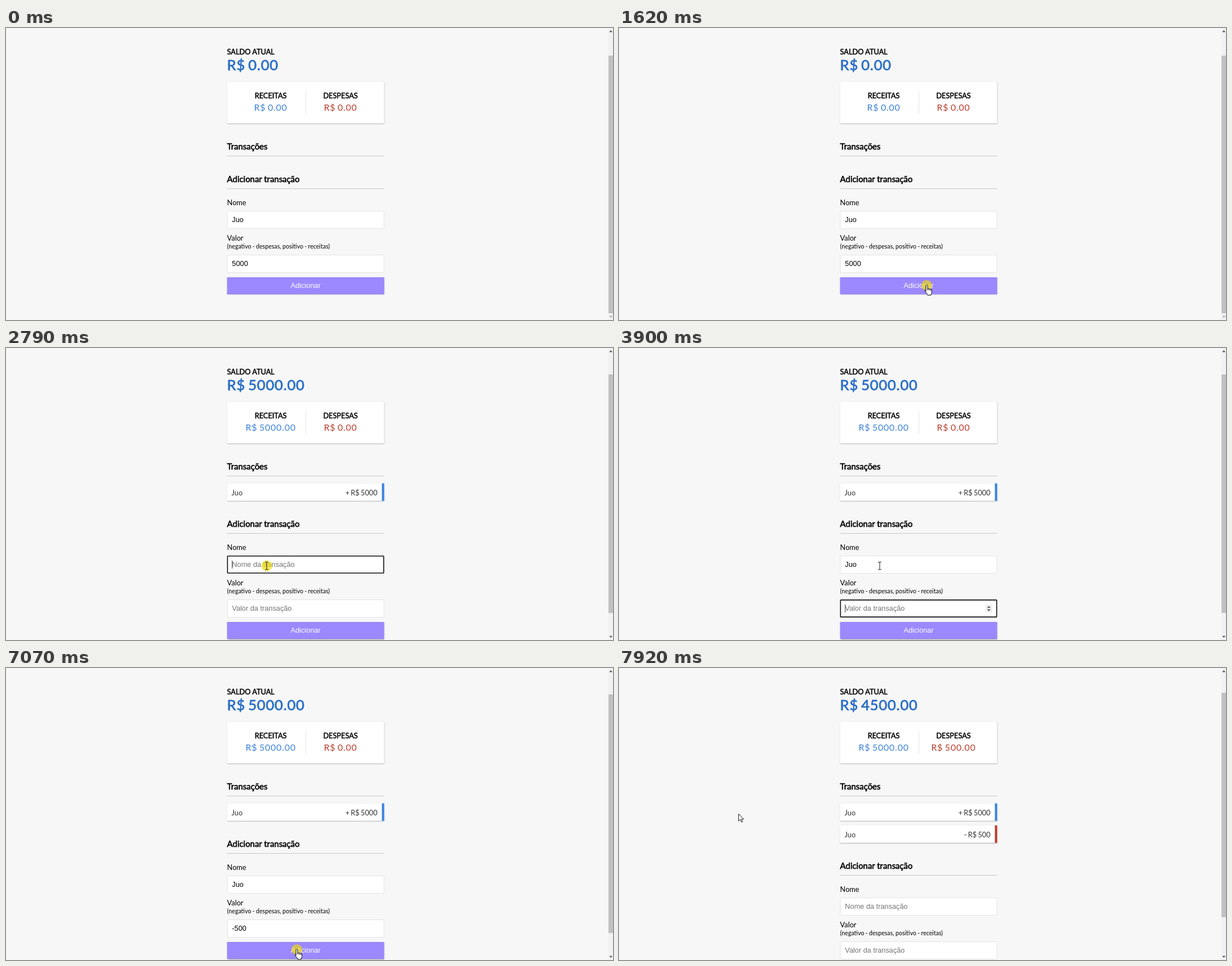
Write an HTML page that moves like this. It is 1078 px wide and 519 px high and loops after 8000 ms.

```html
<!DOCTYPE html>
<html lang="pt">
<head>
<meta charset="utf-8">
<title>Controle de despesas</title>
<style>
* { box-sizing: border-box; }
html, body { margin: 0; width: 100%; height: 100%; overflow: hidden; background: #f7f7f7; }
.stage { position: relative; width: 100%; height: 100%; overflow: clip; contain: strict; }
.page {
  position: absolute; left: 0; top: 0; width: 350px;
  transform: translate(392.6px, 33.4px) scale(.797); transform-origin: 0 0;
  font: 16px/19px Lato, sans-serif; color: #000;
}
h1, h3, h4 { margin: 0; font-weight: 400; -webkit-text-stroke: .04em; }
h1 { font-size: 32px; line-height: 39px; letter-spacing: 1px; color: #2c70c8; -webkit-text-stroke-width: .033em; }
h3 { font-size: 18.72px; line-height: 22px; padding-bottom: 10px; margin: 40px 0 10px; border-bottom: 1px solid #bbb; }
h4 { font-size: 16px; text-transform: uppercase; }
h1, h4, li span, small { position: relative; top: 1px; }
h1, .money, li { word-spacing: -.08em; }
.summary, li, button { background: #fff; box-shadow: 0 1px 3px rgba(0,0,0,.12), 0 1.3px 2px rgba(0,0,0,.32); }
.summary { display: flex; height: 93px; padding: 20px; margin: 20px 0; text-align: center; }
.summary div { flex: 1; }
.summary div:first-child { border-right: 1px solid #dedede; }
.money { margin: 5px 0; font-size: 20px; line-height: 24px; letter-spacing: 1px; }
.plus { color: #3a80d8; }
.minus { color: #b93c2b; }
ul { list-style: none; padding: 0; margin: 0 0 40px; }
li { display: flex; justify-content: space-between; padding: 10px; margin: 10px 0; color: #333; border-right: 5px solid #3882e0; }
li:first-child { margin-top: 16px; }
li + li { border-color: #c0392b; }
[hidden] { display: none !important; }
label { display: block; padding: 10px 0; }
small { display: block; font-size: 13.33px; word-spacing: -.04em; }
.field {
  position: relative; height: 40px; padding: 10px; border: 1px solid #dedede; border-radius: 2px;
  background: #fff; font: 16px/18px "Liberation Sans", Arial, sans-serif; white-space: pre;
}
.focus { outline: 2.5px solid #101010; outline-offset: -2px; }
.hint { color: #757575; }
.caret { display: inline-block; vertical-align: top; width: 1.25px; height: 18px; margin-right: -1.25px; background: #000; }
.spinner { position: absolute; right: 10px; top: 10px; width: 15px; height: 18px; background: #efefef; fill: #505050; }
.popup {
  position: absolute; z-index: 1; left: -1px; top: 41px; width: 350px; height: 48px; padding: 15px 16px;
  background: #fff; border-radius: 3px; font-size: 13px; box-shadow: 0 1px 4px rgba(0,0,0,.35);
}
button {
  display: block; width: 100%; height: 38px; margin: 10px 0 0; padding: 10px; border: 0;
  background: #9c88ff; color: #fff; font: 16px/18px "Liberation Sans", Arial, sans-serif;
}
.overlay { position: absolute; left: 0; top: 0; pointer-events: none; }
</style>
</head>
<body>
<div class="stage">
<div class="page">
  <h4>Saldo atual</h4>
  <h1 id="balance"></h1>
  <div class="summary">
    <div><h4>Receitas</h4><p class="money plus" id="income"></p></div>
    <div><h4>Despesas</h4><p class="money minus" id="expense"></p></div>
  </div>
  <h3>Transações</h3>
  <ul>
    <li><span>Juo</span><span>+ R$ 5000</span></li>
    <li><span>Juo</span><span>- R$ 500</span></li>
  </ul>
  <h3>Adicionar transação</h3>
  <label>Nome</label>
  <div class="field" id="name"><span></span><div class="popup" hidden>Juo</div></div>
  <label>Valor<small>(negativo - despesas, positivo - receitas)</small></label>
  <div class="field" id="amount"><span></span><svg class="spinner" viewBox="0 0 15 18"><path d="M3.5 7.3l4-4 4 4zM3.5 11l4 4 4-4z"/></svg></div>
  <button>Adicionar</button>
</div>
<svg class="overlay" width="1078" height="519">
  <path fill="#f1f1f1" d="M1069.5 0h8.5v519h-8.5z"/>
  <rect id="thumb" x="1070" width="8" fill="#c1c1c1"/>
  <path fill="#505050" d="M1071.3 7.3l2.9-3.3 2.9 3.3z"/>
  <path id="downArrow" d="M1071.3 511.8l2.9 3.3 2.9-3.3z"/>
  <g id="cursor">
    <circle id="click" r="9.5" fill="#f0dc00" fill-opacity=".65"/>
    <path id="arrow" fill="#fff" stroke="#000" stroke-width=".9" d="M.5.5V13l2.9-2.7 2.1 4.9 2-.9-2.1-4.7h3.9z"/>
    <path id="text" fill="none" stroke="#111" d="M-2.8-6.6h2L0-6 .8-6.6h2M0-6V6.2M-2.8 6.8h2L0 6.2l.8.6h2"/>
    <path id="hand" fill="#fff" stroke="#000" stroke-linejoin="round" d="M-1.5 11V1a1.5 1.5 0 0 1 3 0V6q2.2-1 2.7.6 2.2-.9 2.6.6 2.2-.6 2.2 1.4V12q0 2-1.5 3.6V17.4H1.5V16Q-1 13.5-3.2 10.2-4.2 8.4-3 8-2 7.7-1.5 9M1.5 6V8.8M4.2 6.6V9M6.8 7.2V9.4"/>
  </g>
</svg>
</div>
<script>
const LOOP = 8000, BLINK = 530;
const FIRST_ADD = 1770, SECOND_ADD = 7220;
const NAME_FOCUS = 2720, AMOUNT_FOCUS = 3900, BLUR = 7070;
const nameKeys = [[3190, 'J'], [3340, 'u'], [3570, 'o']];
const amountKeys = [[4890, '-'], [5350, '5'], [5590, '0'], [5820, '0']];
const clicks = [1620, NAME_FOCUS, BLUR];
// start, end, number of steps, destination
const moves = [
  [130, 920, 11, 548, 458.5],
  [1000, 1070, 2, 546.5, 457.5],
  [2100, 2640, 8, 463, 387],
  [6370, 6670, 5, 516.5, 500.5],
  [7380, 7920, 8, 212, 259]
];
// balance, income, expense, thumb top, thumb bottom
const totals = [[0, 0, 0, 49, 507], [5000, 5000, 0, 47, 471], [4500, 5000, 500, 44, 443]];

const $ = id => document.getElementById(id);
const show = (element, visible) => element.style.display = visible ? '' : 'none';
const within = (t, start, end) => t >= start && t < end;
const money = n => 'R$ ' + n.toFixed(2);
const items = document.querySelectorAll('li');
const popup = document.querySelector('.popup');
const spinner = document.querySelector('.spinner');

function cursorAt(t) {
  let x = 1010.5, y = 521;
  for (const [start, end, count, toX, toY] of moves) {
    if (t < start) break;
    const step = Math.min(count, Math.floor((t - start) / (end - start) * (count - 1) + 1e-6) + 1);
    const eased = 1 - (1 - step / count) ** 2;
    x += (toX - x) * eased;
    y += (toY - y) * eased;
  }
  return [x, y];
}

function drawField(id, hint, initial, keys, t, focusStart, focusEnd) {
  const pressed = keys.filter(([time]) => time <= t);
  const value = t < FIRST_ADD ? initial : t < SECOND_ADD ? pressed.map(key => key[1]).join('') : '';
  const focused = within(t, focusStart, focusEnd);
  const lastChange = Math.max(focusStart, ...pressed.map(key => key[0]));
  const caretOn = focused && Math.floor((t - lastChange) / BLINK) % 2 === 0;
  const caret = caretOn ? '<i class="caret"></i>' : '';
  $(id).classList.toggle('focus', focused);
  $(id).firstChild.innerHTML = value ? value + caret : `${caret}<span class="hint">${hint}</span>`;
}

function draw(t) {
  const added = (t >= FIRST_ADD) + (t >= SECOND_ADD);
  const [balance, income, expense, top, bottom] = totals[added];
  $('balance').textContent = money(balance);
  $('income').textContent = money(income);
  $('expense').textContent = money(expense);
  items.forEach((item, i) => item.hidden = i >= added);
  $('thumb').setAttribute('y', top);
  $('thumb').setAttribute('height', bottom - top);
  $('downArrow').setAttribute('fill', added ? '#505050' : '#a3a3a3');

  drawField('name', 'Nome da transação', 'Juo', nameKeys, t, NAME_FOCUS, AMOUNT_FOCUS);
  drawField('amount', 'Valor da transação', '5000', amountKeys, t, AMOUNT_FOCUS, BLUR);
  popup.hidden = !within(t, nameKeys[0][0], AMOUNT_FOCUS);

  const [x, y] = cursorAt(t);
  const hit = document.elementFromPoint(x, y);
  const field = hit?.closest('.field');
  const kind = field ? 'text' : hit?.closest('button') ? 'hand' : 'arrow';
  show($('cursor'), t >= moves[0][0]);
  $('cursor').setAttribute('transform', `translate(${x} ${y})`);
  for (const id of ['arrow', 'text', 'hand']) show($(id), id === kind);
  show($('click'), clicks.some(time => within(t, time, time + 150)));
  show(spinner, field === $('amount') || within(t, AMOUNT_FOCUS, BLUR));
}

const begin = performance.now();
function frame() {
  draw((performance.now() - begin) % LOOP);
  requestAnimationFrame(frame);
}
frame();
</script>
</body>
</html>
```
